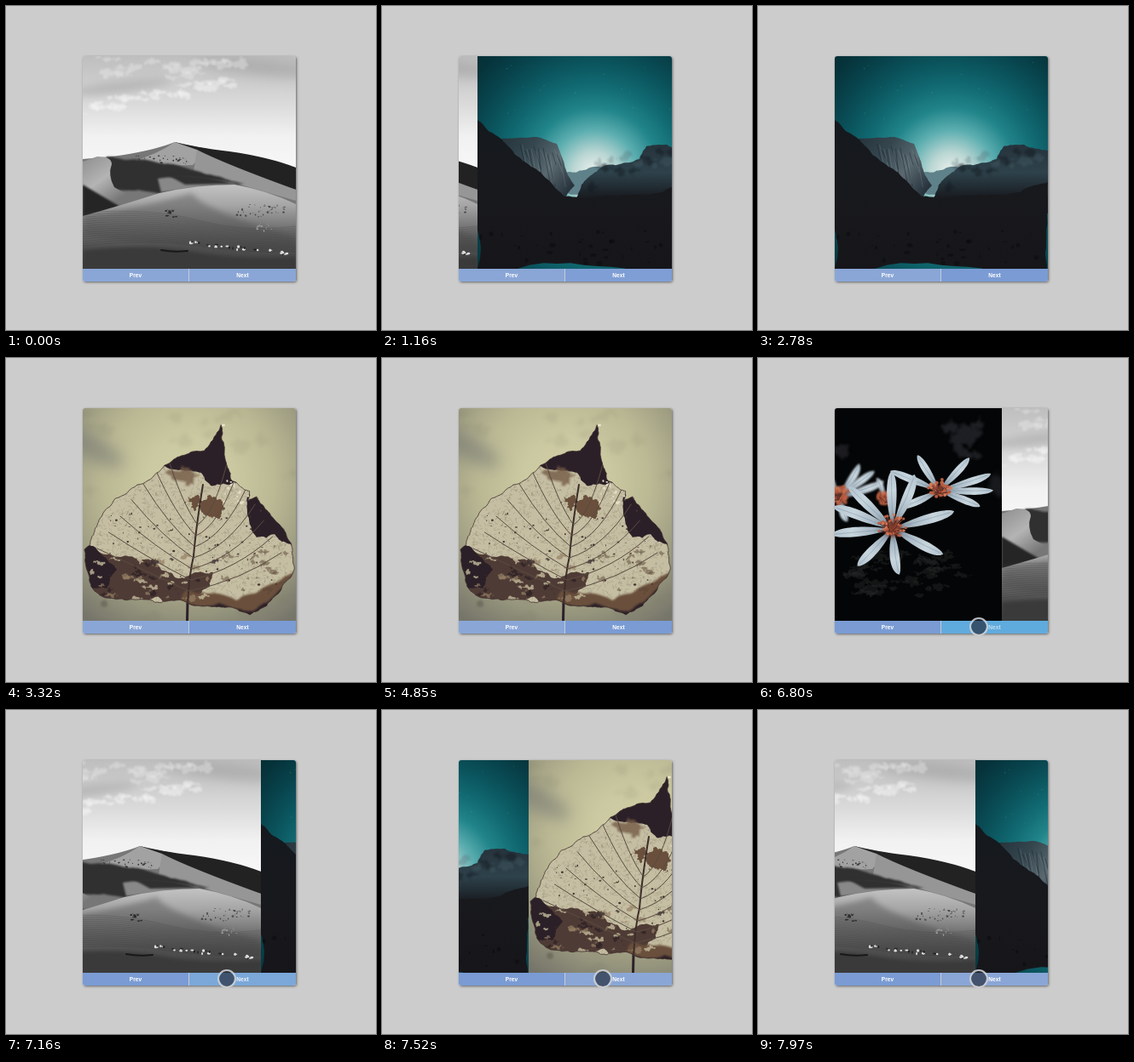
These frames come from a looping animation (434 px wide and 381 px high, 8 s). An HTML page with a canvas:

```html
<!DOCTYPE html>
<html lang="en">
<head>
<meta charset="utf-8">
<title>Photo slider</title>
<style>
  html, body { margin: 0; width: 100%; height: 100%; overflow: hidden; background: #ccc; }
  #stage { position: relative; width: 434px; height: 381px; overflow: hidden; background: #ccc; }
  #slider, #shadow { position: absolute; left: 90px; top: 59px; width: 250px; height: 265px; border-radius: 3px; }
  #slider { overflow: hidden; background: #c3cbdc; }
  #shadow { box-shadow: 1px 1px 3px rgba(0,0,0,.5); }
  #view { position: absolute; width: 250px; height: 250px; overflow: hidden; }
  #view canvas { position: absolute; left: 0; top: 0; }
  .btn { position: absolute; top: 250px; height: 15px; color: #fff; text-align: center;
    font: bold 6.6px/15px "Liberation Sans", Arial, sans-serif; }
  #prev { left: 0; width: 124px; }
  #next { left: 125px; width: 125px; }
  #ring { position: absolute; left: 247.5px; top: 305px; width: 18px; height: 18px; border-radius: 50%;
    border: 2px solid rgba(205,208,212,.9); background: rgba(32,40,56,.66); background-clip: padding-box; }
  #arrow { position: absolute; left: -1px; top: -1px; }
</style>
</head>
<body>
<div id="stage">
  <div id="shadow"></div>
  <div id="slider">
    <div id="view"></div>
    <div class="btn" id="prev">Prev</div>
    <div class="btn" id="next">Next</div>
  </div>
  <div id="ring"></div>
  <svg id="arrow" width="14" height="22" viewBox="-1 -1 14 22">
    <path d="M0 0V15.5L3.6 12.2L6.2 18.4L8.8 17.3L6.3 11.3H11.2Z" fill="#050505" stroke="#fff"/>
  </svg>
</div>
<script>
const SIZE = 250, LOOP = 8000;
const $ = id => document.getElementById(id);

let seed = 7;
const rnd = (a = 0, b = 1) => {
  seed = (seed * 16807) % 2147483647;
  return a + (b - a) * seed / 2147483647;
};
const times = (n, fn) => { for (let i = 0; i < n; i++) fn(i); };

function photo(paint) {
  const c = document.createElement('canvas');
  c.width = c.height = SIZE;
  $('view').append(c);
  const g = c.getContext('2d');
  g.lineCap = g.lineJoin = 'round';
  paint(g);
  return c;
}

function stops(f, colors) {
  colors.forEach((c, i) => f.addColorStop(i / (colors.length - 1), c));
  return f;
}
const linear = (g, x0, y0, x1, y1, ...colors) => stops(g.createLinearGradient(x0, y0, x1, y1), colors);
const radial = (g, x, y, r, ...colors) => stops(g.createRadialGradient(x, y, 0, x, y, r), colors);

function backdrop(g, fill) {
  g.fillStyle = fill;
  g.fillRect(0, 0, SIZE, SIZE);
}

function shape(g, d, fill, blur = 0) {
  g.filter = blur ? `blur(${blur}px)` : 'none';
  g.fillStyle = fill;
  g.fill(new Path2D(d));
  g.filter = 'none';
}

function line(g, d, color, width = 1) {
  g.strokeStyle = color;
  g.lineWidth = width;
  g.stroke(new Path2D(d));
}

// A polygon whose edges are broken up by midpoint displacement.
function rough(corners, k = .1, depth = 4) {
  let pts = corners.split(' ').map(p => p.split(',').map(Number));
  times(depth, () => {
    pts = pts.flatMap(([x, y], i) => {
      const [u, v] = pts[(i + 1) % pts.length], d = rnd(-k, k);
      return [[x, y], [(x + u) / 2 + (v - y) * d, (y + v) / 2 - (u - x) * d]];
    });
  });
  return 'M' + pts.join('L') + 'Z';
}

function blob(g, x, y, rx, ry, fill, blur = 0, turn = 0) {
  g.filter = blur ? `blur(${blur}px)` : 'none';
  g.fillStyle = fill;
  g.beginPath();
  g.ellipse(x, y, rx, ry, turn, 0, 7);
  g.fill();
  g.filter = 'none';
}

// Ragged patch with an irregular outline.
const patch = (g, x, y, rx, ry, fill, blur = 0) =>
  shape(g, rough(`${x - rx},${y} ${x},${y - ry} ${x + rx},${y} ${x},${y + ry}`, .4, 4), fill, blur);

const specks = (g, n, x, y, w, h, r, color) => times(n, () =>
  blob(g, x + rnd(0, w), y + rnd(0, h), rnd(.3, r), rnd(.3, r * .8), color));

function dunes(g) {
  backdrop(g, linear(g, 0, 0, 0, 125, '#bebebe', '#cdcdcd', '#dedede', '#f1f1f1', '#f6f6f6'));
  blob(g, 205, 12, 70, 9, '#adadad', 7, .1);
  blob(g, 45, 36, 60, 7, '#b8b8b8', 5, -.12);
  times(26, i => patch(g, 8 + i * 6.4 + rnd(-12, 12), 62 - i * 1.3 + rnd(-7, 7), rnd(6, 18), rnd(1, 4), 'rgba(248,248,248,.5)', 1));
  times(14, () => patch(g, rnd(0, 180), rnd(2, 22), rnd(8, 22), rnd(1, 4), 'rgba(235,235,235,.4)', 1));

  // far ridge
  shape(g, 'M0 121L34 118Q80 112 108 101L250 131V250H0Z', '#777');
  shape(g, 'M108 101Q130 107 172 112Q220 119 250 131V157Q190 140 108 101Z', '#222');
  shape(g, 'M60 123Q88 115 108 101L134 110Q139 119 129 128Q100 130 60 123Z', '#a2a2a2');
  shape(g, 'M134 110Q165 126 250 157V170L130 135Z', '#969696');
  // hollow and small dune
  shape(g, rough('28,118 75,122 130,134 190,150 95,162 35,158', .05), '#303030', 1);
  shape(g, 'M88 144Q120 138 184 150L92 160Z', '#888', 1);
  shape(g, 'M100 140Q140 138 176 150L120 151Z', '#303030', 1);
  shape(g, 'M0 124L17 118Q34 118 34 127Q29 140 37 154Q55 166 70 164L28 178 0 152Z',
    linear(g, 5, 120, 40, 170, '#939393', '#b4b4b4', '#777'));
  shape(g, 'M0 151Q25 166 44 177L0 190Z', '#252525', 1);
  // near dune
  shape(g, 'M0 188Q40 177 90 161Q135 151 178 151Q217 158 250 174V250H0Z',
    linear(g, 0, 150, 0, 250, '#c4c4c4', '#a6a6a6', '#777', '#515151', '#3d3d3d'));
  shape(g, 'M0 187Q70 178 128 161Q142 182 250 212V229Q110 230 0 211Z', 'rgba(72,72,72,.4)', 3);
  times(16, i => line(g, `M0 ${184 + i * 2.6}Q80 ${178 + i * 2.4} 135 ${193 + i * 2}T250 ${200 + i * 2}`, 'rgba(40,40,40,.25)', .8));
  shape(g, 'M0 228Q80 220 130 230T250 236V250H0Z', '#3a3a3a', 2);

  specks(g, 34, 60, 117, 65, 10, 1.3, '#333');
  specks(g, 40, 180, 174, 58, 15, 1.5, '#4a4a4a');
  specks(g, 12, 96, 180, 15, 10, 2, '#292929');
  specks(g, 16, 198, 196, 25, 10, 1.6, '#999');
  times(34, i => {
    const x = rnd(125, 248);
    blob(g, x, 220 + (x - 130) * .11 + rnd(-2, 2), rnd(.6, 2.2), rnd(.6, 1.8), i % 3 ? '#ddd' : '#222');
  });
  line(g, 'M92 228Q107 231 123 229', '#181818', 2);
}

function valley(g) {
  backdrop(g, radial(g, 137, 138, 205, '#f2f4ef', '#b9d6d3', '#5caeb0', '#21858a', '#126b73',
    '#0b565f', '#08434c', '#06343c', '#052a32'));
  specks(g, 16, 10, 5, 230, 80, .6, 'rgba(180,220,220,.5)');
  shape(g, rough('104,137 125,134 140,130 155,132 155,160 104,160'), '#5f818a');
  shape(g, rough('122,151 152,128 190,121 198,106 222,104 250,111 250,185 110,185', .08),
    linear(g, 0, 105, 0, 168, '#26333c', '#2e424b', '#17191e'));
  times(14, i => patch(g, 135 + i * 8, rnd(125, 155) - i * 1.5, rnd(4, 12), rnd(3, 8),
    i % 2 ? 'rgba(76,102,111,.3)' : 'rgba(18,22,29,.45)', 1));
  shape(g, rough('28,97 70,95 93,103 106,140 114,152 104,165 60,153', .05),
    linear(g, 30, 95, 108, 155, '#26343b', '#35464f', '#5a6970', '#29343e'));
  times(18, i => {
    const x = 50 + i * 2.7;
    line(g, `M${x} ${102 + i / 2 + rnd(0, 8)}L${x + rnd(4, 9)} ${rnd(125, 156)}`,
      i % 2 ? 'rgba(140,155,160,.25)' : 'rgba(18,25,33,.4)');
  });
  shape(g, rough('0,75 29,98 63,130 101,164 130,167 185,163 250,148 250,260 0,260', .06),
    linear(g, 0, 80, 0, 250, '#15191e', '#18191d', '#16161a'));
  specks(g, 35, 0, 205, 250, 40, 4, 'rgba(8,9,12,.45)');
}

function leaf(g) {
  const INK = '#2c2028', BROWN = '#694f3c', VEIN = '#594b40';
  backdrop(g, radial(g, 125, 85, 200, '#d2cfa6', '#cbc9a1', '#bbb994', '#9b9a80', '#76756a'));
  blob(g, 8, 45, 45, 14, 'rgba(110,112,112,.5)', 9, .5);
  times(36, () => patch(g, rnd(0, 250), rnd(0, 250), rnd(6, 22), rnd(4, 10), 'rgba(110,108,92,.11)', 2));
  blob(g, 25, 230, 4, 4, '#716f60', 1);
  line(g, 'M123 228L122.5 250', INK, 3);

  const edge = rough('162,20 150,40 143,50 107,60 64,90 20,130 9,160 2,166 8,204 20,220 72,225 123,229 ' +
    '165,234 196,243 231,216 248,190 245,162 224,130 204,104 194,108 196,98 174,84 166,55', .1, 4);
  g.save();
  g.clip(new Path2D(edge));
  backdrop(g, '#c5bea2');
  times(2600, () => {
    const x = rnd(0, 250), y = rnd(60, 240), a = rnd(0, 6.3);
    line(g, `M${x} ${y}l${3 * Math.cos(a)} ${3 * Math.sin(a)}`, 'rgba(70,62,52,.3)', .5);
  });

  // decayed areas
  shape(g, rough('170,10 140,48 82,68 106,72 139,76 150,91 180,88', .12), INK, .6);
  patch(g, 117, 76, 20, 9, 'rgba(117,92,70,.8)', 1);
  patch(g, 132, 112, 14, 9, BROWN, .6);
  patch(g, 152, 117, 15, 12, BROWN, .6);
  shape(g, rough('196,98 240,130 252,165 225,148 204,152', .14), INK, .6);
  shape(g, rough('0,160 44,175 82,179 92,190 114,200 153,193 149,210 116,231 60,228 0,224', .16), '#4f3b35', .6);
  shape(g, rough('0,158 22,172 40,190 28,212 0,210', .15), INK, .6);
  shape(g, rough('120,215 180,226 231,203 252,186 242,222 205,250 110,234', .1), BROWN, .8);
  shape(g, rough('110,228 160,229 199,239 240,206 215,254 110,250', .1), INK, .8);
  times(45, i => patch(g, rnd(8, 160), rnd(172, 226), rnd(2, 10), rnd(1, 4),
    ['rgba(44,32,36,.75)', 'rgba(150,128,100,.7)', 'rgba(196,187,156,.8)'][i % 3]));
  times(22, () => patch(g, rnd(165, 240), rnd(160, 215), rnd(1, 8), rnd(1, 4), 'rgba(90,70,54,.5)'));
  specks(g, 80, 25, 120, 210, 100, 1.7, '#43342f');
  specks(g, 40, 165, 80, 40, 32, 2, '#e4e0c8');

  // midrib and side veins curving out to both edges
  line(g, 'M123 230Q125 195 130 174Q133 139 141 90', '#3d2e2b', 2);
  times(7, i => {
    const y = 215 - i * 13, x = 125 + i * 1.6, reach = 1 - i * .11;
    line(g, `M${x} ${y}Q${x - 55 * reach} ${y - 25} ${x - 108 * reach} ${y - 50 - i * 6}`, VEIN);
    line(g, `M${x} ${y}Q${x + 60 * reach} ${y - 12} ${x + 108 * reach} ${y - 45 - i * 6}`, VEIN);
  });
  g.restore();
  line(g, edge, 'rgba(57,41,40,.75)', 1);
  blob(g, 165, 20, 2, 1.2, '#eee8d0');
}

function petal(g, x, y, tx, ty, w, soft) {
  const dx = tx - x, dy = ty - y, len = Math.hypot(dx, dy), bend = rnd(-3, 3);
  const at = (k, side) => `${x + dx * k - dy / len * side} ${y + dy * k + dx / len * side}`;
  shape(g, `M${x} ${y}C${at(.45, w * 1.2 + bend)} ${at(.92, w * 1.3 + bend)} ${tx} ${ty}` +
    `C${at(.92, bend - w)} ${at(.45, bend - w * 1.2)} ${x} ${y}Z`,
    linear(g, x, y, tx, ty, '#65727f', '#a9b9c5', '#c8d6de', '#b2c2cd'), soft);
  line(g, `M${at(.25, 0)}Q${at(.6, bend)} ${at(.93, bend * .3)}`, 'rgba(90,110,128,.4)', .8);
}

// Petal tips sit on a tilted ellipse, one angle in degrees for each petal.
function flower(g, x, y, rx, ry, w, soft, angles) {
  for (const deg of angles) {
    const a = deg * Math.PI / 180;
    petal(g, x, y, x + rx * Math.cos(a), y - 7 + ry * Math.sin(a), w, soft);
  }
  const r = w * 2.7;
  blob(g, x, y, r * .6, r * .5, '#74382a', 2);
  times(r * 3, i => {
    const a = rnd(0, 6.3), k = rnd(.4, 1) * r, px = x + Math.cos(a) * k, py = y + Math.sin(a) * k * .8 - 3;
    line(g, `M${x + rnd(-4, 4)} ${y + 3}L${px} ${py}`, i % 2 ? '#8f402c' : '#552c25');
    blob(g, px, py, 1.2 + soft, 1.2 + soft, i % 3 ? '#b95d42' : '#d17c5b', soft);
  });
}

function flowers(g) {
  backdrop(g, '#040506');
  times(12, i => patch(g, 10 + i * 5, 30 + i * 2, rnd(5, 12), rnd(4, 9), '#1b1c20', 1.5));
  times(12, () => patch(g, rnd(190, 225), rnd(17, 56), rnd(6, 13), rnd(6, 12), '#1e1f24', 1.5));
  patch(g, 246, 88, 10, 18, '#18191d', 2);
  times(45, () => {
    const a = rnd(0, 6.3), k = rnd(.3, 1);
    patch(g, 130 + 80 * k * Math.cos(a), 192 + 30 * k * Math.sin(a), rnd(5, 16), rnd(1, 4), 'rgba(42,44,46,.4)', .7);
  });
  flower(g, 59, 105, 56, 36, 5, 1.1, [250, 318, 295, 150, 124, 340, 80]);
  flower(g, 113, 108, 20, 22, 3.5, .8, [240, 300]);
  flower(g, 177, 97, 64, 38, 5, .7, [246, 205, 303, 10, 42, 340, 135]);
  flower(g, 122, 142, 74, 61, 6.5, .3, [198, 225, 269, 290, 347, 37, 84, 124, 167]);
}

const photos = [dunes, valley, leaf, flowers].map(photo);

const ramp = (t, from, to) => Math.min(1, Math.max(0, (t - from) / (to - from)));
const swing = k => .5 - Math.cos(k * Math.PI) / 2;
const mix = (a, b, k) => a.map((v, i) => v + (b[i] - v) * k);
const rgb = c => `rgb(${c.map(Math.round)})`;

const LIGHT = [138, 166, 214], DARK = [122, 155, 212], FLASH = [96, 171, 221];

// Three timed slides, then an accelerating run while Next is held down.
function position(t) {
  const slides = [810, 2780, 4850].reduce((sum, s) => sum + swing(ramp(t, s + 20, s + 430)), 0);
  const s = Math.max(0, t - 6664) / 1000;
  return slides + 1.274 * s + 2.151 * s * s;
}

function draw(t) {
  const pos = position(t);
  photos.forEach((c, i) => {
    const off = ((i - pos + 1) % 4 + 4) % 4 - 1;
    c.style.transform = `translateX(${Math.round(off * SIZE)}px)`;
  });

  const hover = ramp(t, 5400, 5600);
  const flash = ramp(t, 6610, 6710) * (1 - ramp(t, 6850, 7340));
  const idle = mix(LIGHT, DARK, ramp(t, 830, 1300));
  $('prev').style.background = rgb(mix(LIGHT, DARK, hover));
  $('next').style.background = rgb(mix(mix(idle, LIGHT, hover), FLASH, flash));
  $('next').style.color = `rgba(255,255,255,${1 - .4 * flash})`;

  const enter = ramp(t, 5190, 5290);
  const x = 181 + 11 * enter + 65 * swing(ramp(t, 5290, 5990)), y = 344 - 29 * enter;
  $('arrow').style.transform = `translate(${x}px,${y}px)`;
  $('arrow').style.visibility = t >= 5190 && t < 6620 ? 'visible' : 'hidden';
  const press = ramp(t, 6120, 6260);
  $('ring').style.opacity = press;
  $('ring').style.transform = `scale(${.7 + .3 * press})`;
}

const start = performance.now();
function tick() {
  draw((performance.now() - start) % LOOP);
  requestAnimationFrame(tick);
}
tick();
</script>
</body>
</html>
```
